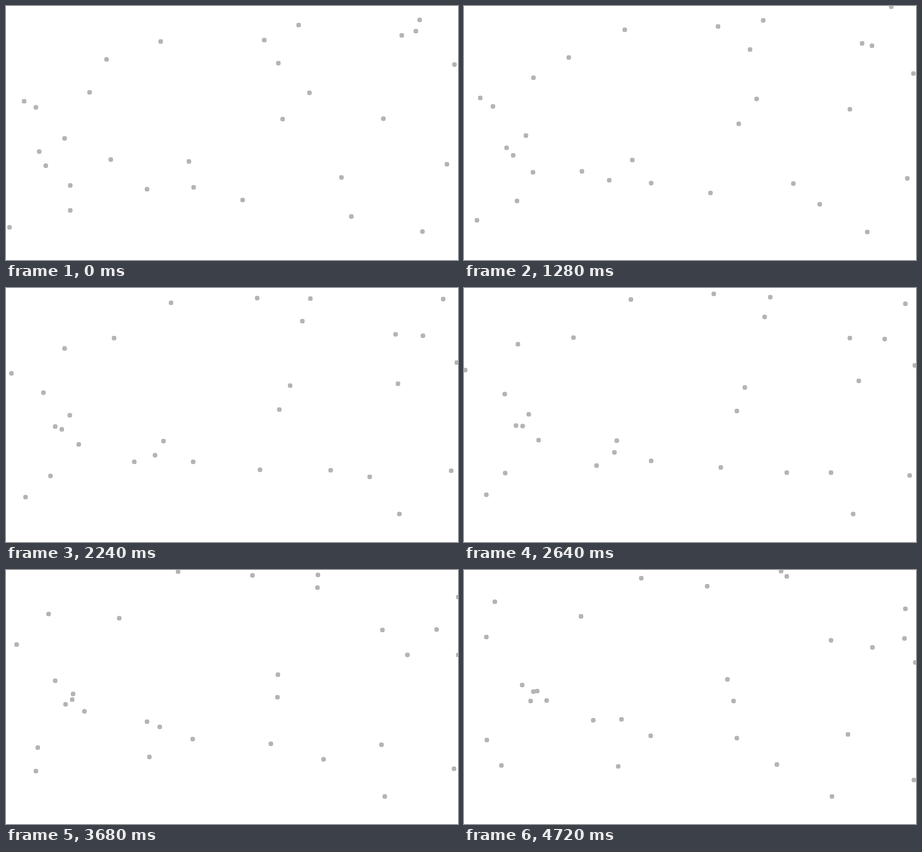
An HTML page for the animation above (4.8 s loop, 960x540 px).

```html
<!DOCTYPE html>
<html lang="en">
<head>
<meta charset="utf-8">
<title>Drifting dots</title>
<style>
html, body { margin: 0; width: 100%; height: 100%; overflow: hidden; background: #fff; }
svg { display: block; width: 960px; height: 540px; }
</style>
</head>
<body>
<svg id="stage" viewBox="0 0 960 540" fill="#b4b4b4" shape-rendering="crispEdges"></svg>
<script>
const W = 960, H = 540, R = 5, STEP = 80, STEPS = 60;
const stage = document.getElementById("stage");
const dots = [];

// Disc built from whole pixel rows
let disc = "";
for (let y = -R; y <= R; y++) {
  const half = Math.floor(Math.sqrt(R * R - y * y));
  disc += `M${-half} ${y}h${2 * half + 1}v1h${-2 * half - 1}z`;
}

// Reflects a coordinate off the walls at 0 and max
const bounce = (v, max) => Math.round(max - Math.abs(max - Math.abs(v)));

// A dot starts at x, y and drifts by dx, dy over one loop
function add(x, y, dx, dy) {
  const el = document.createElementNS("http://www.w3.org/2000/svg", "path");
  el.setAttribute("d", disc);
  stage.append(el);
  dots.push({ el, x, y, dx, dy });
}

add(327.6, 75, 48, -92);
add(212.8, 112.9, 35, -14.5);
add(177, 183.4, -112, -116);
add(38.4, 202, 84.6, 42);
add(63.4, 215.2, -110, -73);
add(124.4, 281, 22.8, -23);
add(70.3, 309.1, 71, -31);
add(84.3, 339, 71, -82);
add(222, 326.2, 105, 90.7);
add(299, 389.2, 35, -72.2);
add(388, 330.2, -114, -11);
add(398, 385, -2, -33);
add(135.8, 381.2, 39, -104.1);
add(136, 434, -88, -73);
add(7, 469.6, 72, -54.5);
add(502.2, 411.7, 77, -55);
add(548, 71.7, -32, -106);
add(578, 121, 107, -108);
add(621.2, 40, 52, -37.9);
add(643.8, 184.2, -85.1, 48);
add(586.8, 239.9, -14.4, 38);
add(800.8, 238.9, 66, -75);
add(840, 61.7, 95, 83);
add(870, 52.6, -91, 96);
add(878.4, 29.2, 104.5, -110.9);
add(951.6, 123.9, 10.5, 72);
add(935.6, 336, 19.2, 110);
add(711.9, 364.1, -48, 49);
add(733, 447.2, 82, -98);
add(883.9, 479, -103, 2);

function draw(ms) {
  const p = Math.floor(ms / STEP) % STEPS / (STEPS - 1);
  for (const { el, x, y, dx, dy } of dots) {
    el.setAttribute("transform", `translate(${bounce(x + dx * p, W)} ${bounce(y + dy * p, H)})`);
  }
}

const start = performance.now();
function tick() {
  draw(performance.now() - start);
  requestAnimationFrame(tick);
}
tick();
</script>
</body>
</html>
```
